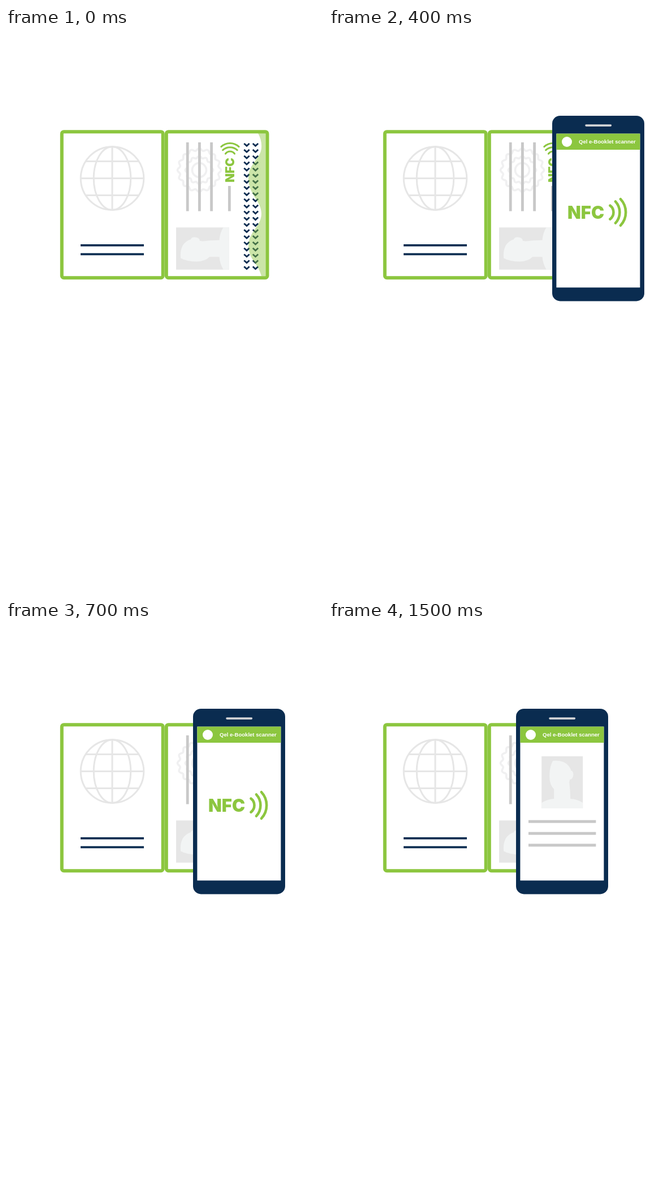
These frames come from a looping animation (561 by 998 pixels, 2000 ms). An HTML page:

```html
<!DOCTYPE html>
<html lang="en">
<head>
<meta charset="utf-8">
<title>Passport scan</title>
<style>
  html, body { margin: 0; width: 100%; height: 100%; overflow: hidden; background: #fff; }
  svg { display: block; width: 100%; height: 100%; }
  .green { fill: #8cc63f; }
  .navy { fill: #0a2c50; }
  .bar { fill: #c8c8c8; }
  .cover { fill: #fff; stroke: #8cc63f; stroke-width: 6; }
  .globe { fill: none; stroke: #e6e6e6; stroke-width: 3; }
  .rosette { fill: none; stroke: #f0f0f1; stroke-width: 3.6; }
  .chevrons { fill: none; stroke: #0a2c50; stroke-width: 2.8; }
  .nfc { font: 900 31px Inter, "Liberation Sans", sans-serif; }
  .waves { fill: none; stroke: #8cc63f; stroke-width: 4.6; stroke-linecap: round; }
  .title { font: bold 9.55px "Liberation Sans", Arial, sans-serif; fill: #fff; }
</style>
</head>
<body>
<svg viewBox="0 0 561 998">
  <defs>
    <g id="nfc">
      <text class="nfc green" x="-2" y="11.3">NFC</text>
      <path class="waves" d="M73.5 -11.7A15 15 0 0 1 73.5 12.3M83 -18.8A28 28 0 0 1 83 19.2M92 -23A34 34 0 0 1 92 23.5"/>
    </g>
    <g id="portrait">
      <rect width="73" height="92" fill="#e6e6e6"/>
      <path fill="#f2f4f4" d="M0 92V82Q10 76 22 75V58Q14 50 14 36Q14 18 20 8Q42 6 50 20Q52 23 52 25Q57 27 56 34Q55 41 50 41L49 46Q51 60 51 75Q64 76 73 82V92Z"/>
    </g>
  </defs>

  <g id="passport">
    <rect class="cover" x="98.8" y="183.2" width="178.9" height="258" rx="3.5"/>
    <g class="globe">
      <circle cx="188" cy="265.5" r="55.8"/>
      <ellipse cx="188" cy="265.5" rx="32.8" ry="55.8"/>
      <path d="M188 209.5V321.5M132 265.5H244M141.5 235.5H234.5M141.5 295.5H234.5"/>
    </g>
    <rect class="navy" x="132" y="382" width="112" height="3.7"/>
    <rect class="navy" x="132" y="397.7" width="112" height="3.7"/>

    <rect class="cover" x="283.8" y="183.2" width="178.7" height="258" rx="3.5"/>
    <g class="rosette" transform="translate(342 251)">
      <path id="outerRing"/>
      <path id="innerRing"/>
      <circle r="12.5"/>
    </g>
    <g class="bar">
      <rect x="318.8" y="202" width="4.8" height="121.5"/>
      <rect x="340" y="202" width="4.8" height="121.5"/>
      <rect x="361.2" y="202" width="4.8" height="121.5"/>
      <rect x="393" y="279" width="4.8" height="44.5"/>
    </g>
    <use href="#nfc" transform="translate(396.3 271.5) rotate(-90) scale(.672)"/>
    <use href="#portrait" transform="translate(301 426.8) rotate(-90) scale(1.02)"/>
    <path id="chevrons" class="chevrons"/>
    <path class="green" opacity=".45" d="M446 186Q453 198 452 212C451 230 429 240 429 265C429 295 452 305 452 328C452 350 429 360 429 385C430 410 446 415 452 438H459.5V186Z"/>
  </g>

  <g id="phone">
    <rect class="navy" y="155" width="163" height="327.4" rx="14"/>
    <rect x="58.2" y="170.3" width="47" height="3.6" rx="1.8" fill="#d2d3d6"/>
    <rect x="7.4" y="186.6" width="148" height="271.8" fill="#fff"/>
    <rect class="green" x="7.4" y="186.6" width="148" height="28.4"/>
    <circle cx="26" cy="201" r="9" fill="#fff"/>
    <text class="title" x="47" y="204.3">Qel e-Booklet scanner</text>
    <use id="prompt" href="#nfc" transform="translate(29 325.3)"/>
    <g id="spinner" class="green"></g>
    <g id="record">
      <use href="#portrait" x="-36.5" y="-80"/>
      <g class="bar">
        <rect x="-59.7" y="32.7" width="119.4" height="5"/>
        <rect x="-59.7" y="53.7" width="119.4" height="5"/>
        <rect x="-59.7" y="74.5" width="119.4" height="5"/>
      </g>
    </g>
  </g>
</svg>
<script>
const $ = id => document.getElementById(id);
const LOOP = 2000, STEP = 100, DOTS = 9;
const PHONE_X = [565, 508, 463, 425, 395, 369, 347, 331];

function scallop(radius, depth, lobes) {
  const points = [];
  for (let i = 0; i < 240; i++) {
    const a = i / 240 * 2 * Math.PI;
    const r = radius + depth * Math.cos(lobes * a);
    points.push(`${(r * Math.cos(a)).toFixed(2)} ${(r * Math.sin(a)).toFixed(2)}`);
  }
  return `M${points.join('L')}Z`;
}

function chevronColumns() {
  let d = '';
  for (const x of [426, 441.5])
    for (let row = 0; row < 21; row++)
      d += `M${x - 4.7} ${204 + row * 10.87}l4.7 4.3l4.7 -4.3`;
  return d;
}

function spinnerDots() {
  let dots = '';
  for (let i = 0; i < DOTS; i++) {
    const a = (-110 - i * 360 / DOTS) * Math.PI / 180;
    dots += `<circle cx="${24 * Math.cos(a)}" cy="${23.4 * Math.sin(a)}" r="5.6" opacity="${1 - i * .097}"/>`;
  }
  return dots;
}

function show(id, visible) {
  $(id).setAttribute('visibility', visible ? 'visible' : 'hidden');
}

function render(time) {
  const t = Math.floor(time % LOOP / STEP) * STEP;
  const x = PHONE_X[Math.min(t / STEP, PHONE_X.length - 1)];
  $('phone').setAttribute('transform', `translate(${x} 0)`);

  show('prompt', t < 900);
  show('spinner', t >= 900 && t < 1300);
  show('record', t >= 1300);

  const turn = t < 1100 ? 0 : 120;
  $('spinner').setAttribute('transform', `translate(77.5 318.8) rotate(${turn})`);
  const grow = Math.min(1, Math.max(0, (t - 1300) / 200));
  $('record').setAttribute('transform', `translate(81.7 319) scale(${.232 + .768 * grow})`);
}

$('outerRing').setAttribute('d', scallop(36.5, 2, 16));
$('innerRing').setAttribute('d', scallop(23, 1.6, 12));
$('chevrons').setAttribute('d', chevronColumns());
$('spinner').innerHTML = spinnerDots();

const start = performance.now();
function tick() {
  render(performance.now() - start);
  requestAnimationFrame(tick);
}
tick();
</script>
</body>
</html>
```
